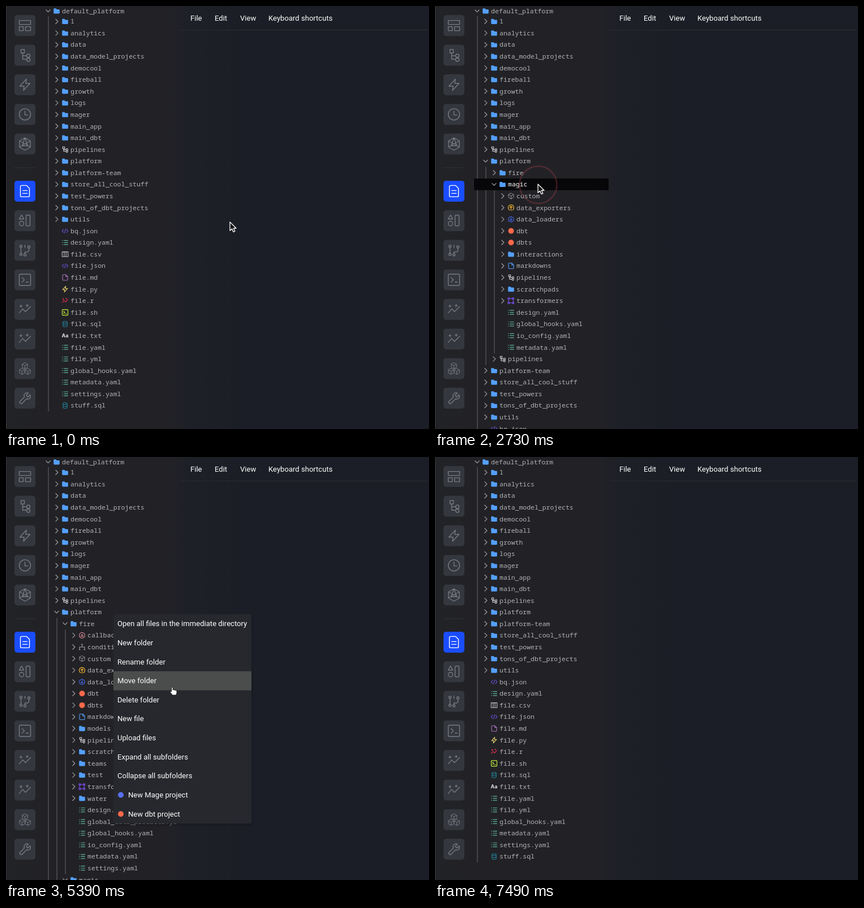
Animation, 748 px wide and 748 px high, one loop 7910 ms. Source, as an HTML page:

```html
<!DOCTYPE html>
<html lang="en">
<head>
<meta charset="utf-8">
<title>File browser</title>
<style>
  html, body { margin: 0; width: 100%; height: 100%; overflow: hidden; background: #1b1e26; }
  svg { display: block; width: 100vw; height: 100vh; }
  .mono { font: 11.47px "Noto Sans Mono", "DejaVu Sans Mono", monospace; fill: #b3b3b5; }
  .sans { font: 13.08px Roboto, Inter, sans-serif; fill: #fff; }
  .line { fill: none; stroke-linecap: round; stroke-linejoin: round; }
</style>
</head>
<body>
<svg viewBox="0 0 748 748" xmlns="http://www.w3.org/2000/svg">
  <defs>
    <linearGradient id="bg">
      <stop offset="0" stop-color="#222327"/>
      <stop offset=".1" stop-color="#222226"/>
      <stop offset=".38" stop-color="#222226"/>
      <stop offset=".43" stop-color="#1e2027"/>
      <stop offset=".56" stop-color="#1b1e26"/>
    </linearGradient>
    <clipPath id="panel"><rect width="301" height="748"/></clipPath>
  </defs>
  <rect width="748" height="748" fill="url(#bg)"/>
  <path d="M.5 0V748" stroke="#3a3b40"/>
  <path d="M310 42.5H746" stroke="#2b2d33"/>
  <g id="nav"></g>
  <g id="bar" class="sans"></g>
  <g id="tree"></g>
  <rect id="scroll" x="300" width="6.5" height="748" rx="2" fill="#48494d"/>
  <g id="menu"></g>
  <circle id="ring" fill="none" stroke="#a8424d" stroke-width="2.4"/>
  <g id="cursor" stroke-linejoin="round">
    <path id="arrow" d="M0 0V15.2L3.6 12L6.1 17.6L8.8 16.4L6.4 11H11Z" fill="#111" stroke="#fff" stroke-width="1.3"/>
    <path id="hand" d="M-1.3 1.2C-1.3-.4 1.2-.4 1.2 1.2V5C1.8 4.2 3.4 4.3 3.6 5.4C4.3 4.7 5.6 5 5.8 6.1C6.6 5.5 8 6 8 7.2V9.5C8 11.5 7 12 7 14H-.2C-.4 12-2.6 10.8-3.6 8.6C-4 7.4-2.6 6.6-1.3 8.2Z" fill="#fff" stroke="#111" stroke-width=".9"/>
  </g>
</svg>
<script>
const LOOP = 7910, STEP = 70, ROW = 20.58, TOP = 17;
const MENU = { x: 190, y: 278, w: 244, row: 33.64 };
const $ = id => document.getElementById(id);
const text = (x, y, s, extra = '') => `<text x="${x}" y="${y}" ${extra}>${s}</text>`;
const stroke = (d, color, width = 1.1) =>
  `<path class="line" d="${d}" stroke="${color}" stroke-width="${width}"/>`;
const dot = (r, color) => `<circle r="${r}" fill="${color}"/>`;

const BOLT = 'M1.2-5.2L-4.4 1H-.6L-1.4 5.2L4.4-1H.6Z';
const BRANCH = 'M-4.2-4.6H-.8V-1.4H-4.2ZM-2.5-1.4V3.4H1.4M-2.5.2H1.6M5 0A1.6 1.6 0 1 1 1.8 0A1.6 1.6 0 1 1 5 0M4.8 3.6A1.6 1.6 0 1 1 1.6 3.6A1.6 1.6 0 1 1 4.8 3.6';
const PAGE = 'M-4.4-3.8Q-4.4-5-3.2-5H1.2L4.6-1.6V3.8Q4.6 5 3.4 5H-3.2Q-4.4 5-4.4 3.8ZM1.2-5V-1.6H4.6';
const TREND = 'M-5 3L-1.8-.4L.8 2.2L5-2.4M-3.4-4V-2M-4.4-3H-2.4M2-4.6V-3M1.2-3.8H2.8';
const CUBE = 'M0-5L4.5-2.5V2.5L0 5L-4.5 2.5V-2.5Z';
const ROUND = 'M5 0A5 5 0 1 1-5 0A5 5 0 1 1 5 0';
const BOX = 'M-4-5H4Q5-5 5-4V4Q5 5 4 5H-4Q-5 5-5 4V-4Q-5-5-4-5Z';

const icons = {
  folder: '<path d="M-5.3-3.2Q-5.3-4.5-4-4.5H-1.2L.3-2.8H4Q5.3-2.8 5.3-1.5V3.3Q5.3 4.6 4 4.6H-4Q-5.3 4.6-5.3 3.3Z" fill="#54a0ff"/>',
  pipe: stroke(BRANCH, '#d6d6d8'),
  json: stroke('M-2.6-2.8L-5.2 0L-2.6 2.8M2.6-2.8L5.2 0L2.6 2.8M.9-3.6L-.9 3.6', '#6b50d7'),
  yaml: stroke('M-1.6-3.6H4.8M-1.6 0H4.8M-1.6 3.6H4.8M-4.6-3.6H-4.2M-4.6 0H-4.2M-4.6 3.6H-4.2', '#62b59f', 1.2),
  csv: stroke('M-5.2-4.3H5.2V4.3H-5.2ZM-1.7-4.3V4.3M1.7-4.3V4.3', '#c2c2c4'),
  md: stroke(PAGE, '#a871bd'),
  py: stroke(BOLT, '#e2cd6c'),
  r: stroke(TREND, '#e12d50', 1.2),
  sh: stroke(BOX + 'M-2.6-1.8L-.6 0L-2.6 1.8M.6 2.2H2.8', '#c3ee3e', 1.2),
  sql: stroke('M-3.8-3.4C-3.8-5.4 3.8-5.4 3.8-3.4V3.4C3.8 5.4-3.8 5.4-3.8 3.4ZM-3.8-3.4C-3.8-1.4 3.8-1.4 3.8-3.4M-3.8 0C-3.8 2 3.8 2 3.8 0', '#217c90'),
  txt: '<text text-anchor="middle" y="3.3" style="font:700 9px Inter,Roboto,sans-serif;fill:#e4e4e6">Aa</text>',
  callback: stroke(ROUND + 'M0-2.2L2.2 1.8H-2.2Z', '#cf8992'),
  cond: stroke('M-4.5 3.5V0H4.5V3.5M0 0V-3.5M-1.4-4.8H1.4M-5 4.6H-3.4M3.4 4.6H5', '#a5a6a9'),
  custom: stroke(CUBE + 'M-4.5-2.5L0 0L4.5-2.5M0 0V5', '#9c9da0', .9),
  out: stroke('M-2.4 4.4A5 5 0 1 1 2.4 4.4M0 5V-2.4M-2.2-.3L0-2.5L2.2-.3', '#eeb32f', 1.2),
  in: stroke(CUBE + 'M0-2.6V2.2M-2 .3L0 2.3L2 .3', '#4468e6'),
  dbt: dot(5, '#ff694a'),
  doc: stroke(PAGE, '#54a0ff'),
  trans: stroke('M-3.8-3.8H3.8V3.8H-3.8ZM-5.2-5.2H-2.6V-2.6H-5.2ZM2.6-5.2H5.2V-2.6H2.6ZM-5.2 2.6H-2.6V5.2H-5.2ZM2.6 2.6H5.2V5.2H2.6Z', '#7c50f0', 1)
};
const special = {
  pipelines: 'pipe', callbacks: 'callback', conditionals: 'cond', custom: 'custom',
  data_exporters: 'out', data_loaders: 'in', dbt: 'dbt', dbts: 'dbt',
  markdowns: 'doc', transformers: 'trans'
};
const iconOf = name => special[name] ||
  (name.includes('.') ? name.split('.').pop().replace('yml', 'yaml') : 'folder');

const list = s => s.split(' ');
const dirs = list('1 analytics data data_model_projects democool fireball growth logs mager main_app main_dbt pipelines platform');
const rest = list('platform-team store_all_cool_stuff test_powers tons_of_dbt_projects utils bq.json design.yaml file.csv file.json file.md file.py file.r file.sh file.sql file.txt file.yaml file.yml global_hooks.yaml metadata.yaml settings.yaml stuff.sql');
const fire = list('callbacks conditionals custom data_exporters data_loaders dbt dbts markdowns models pipelines scratchpads teams test transformers water design.yaml global_data_products.yaml global_hooks.yaml io_config.yaml metadata.yaml settings.yaml');
const magic = list('custom data_exporters data_loaders dbt dbts interactions markdowns pipelines scratchpads transformers design.yaml global_hooks.yaml io_config.yaml metadata.yaml');

// stage: 0 closed, 1 platform open, 2 magic open too, 3 fire open too
function rowsFor(stage) {
  const rows = [];
  const add = (names, depth) => names.forEach(name => rows.push({ name, depth }));
  const open = kids => {
    const row = rows[rows.length - 1];
    row.kids = kids.length;
    add(kids, row.depth + 1);
  };
  add(dirs, 1);
  if (stage) {
    const platform = rows[rows.length - 1];
    const before = rows.length;
    add(['fire'], 2);
    if (stage > 2) open(fire);
    add(['magic'], 2);
    if (stage > 1) open(magic);
    add(['pipelines'], 2);
    platform.kids = rows.length - before;
  }
  add(rest, 1);
  return rows;
}

function rowMarkup(name, depth, y, isOpen, hot) {
  const x = 74.5 + depth * 15;
  const chevron = name.includes('.') ? '' :
    stroke(isOpen ? `M${x - 3.6} ${y - 1.8}l3.6 3.6l3.6-3.6` : `M${x - 1.6} ${y - 4}l4 4l-4 4`, '#97989b', 1.3);
  return chevron + `<g transform="translate(${x + 15} ${y})">${icons[iconOf(name)]}</g>` +
    text(x + 24.5, y + 4, name, hot ? 'style="fill:#fff"' : '');
}

function treeMarkup(stage, hover, width) {
  const rows = rowsFor(stage);
  const end = TOP + rows.length * ROW;
  let guides = `M75 18V${end}`, body = '';
  rows.forEach((row, i) => {
    const y = TOP + (i + .5) * ROW;
    if (y > 765) return;
    if (row.kids) guides += `M${75 + row.depth * 15} ${y + 10.5}V${y + 10.5 + row.kids * ROW}`;
    body += rowMarkup(row.name, row.depth, y, row.kids, i === hover);
  });
  const bar = hover < 0 ? '' :
    `<rect x="69" y="${TOP + hover * ROW}" width="${width}" height="${ROW}" fill="#070709"/>`;
  return `<path d="${guides}" stroke="#66676b" fill="none"/>${bar}
    <g class="mono" clip-path="url(#panel)">${rowMarkup('default_platform', 0, 8.8, true)}${body}</g>`;
}

const commands = ['Open all files in the immediate directory', 'New folder', 'Rename folder',
  'Move folder', 'Delete folder', 'New file', 'Upload files', 'Expand all subfolders',
  'Collapse all subfolders', 'New Mage project', 'New dbt project'];

function menuMarkup(hover) {
  const { x, y, w, row } = MENU, h = row * commands.length;
  const marks = { 9: '#5a70f0', 10: '#ff694a' };
  let out = `<rect x="${x + 1}" y="${y + 2}" width="${w + 2}" height="${h + 2}" fill="#15171c" opacity=".4"/>
    <rect x="${x}" y="${y}" width="${w}" height="${h}" fill="#26282d"/>`;
  if (hover >= 0) out += `<rect x="${x}" y="${y + hover * row}" width="${w}" height="${row}" fill="#4b4d4c"/>`;
  commands.forEach((label, i) => {
    const cy = y + (i + .5) * row;
    if (marks[i]) out += `<g transform="translate(203 ${cy})">${dot(5, marks[i])}</g>`;
    out += text(marks[i] ? 216 : 197, cy + 4.4, label);
  });
  return `<g class="sans">${out}</g>`;
}

function drawNav() {
  const small = (x, y, s) => CUBE.replace(/-?\d*\.?\d+/g, n => n * s)
    .replace(/^M(\S+?)(-\S+?)L/, 'M$1$2L') && `M${x} ${y - 5 * s}l${4.5 * s} ${2.5 * s}v${5 * s}l${-4.5 * s} ${2.5 * s}l${-4.5 * s} ${-2.5 * s}v${-5 * s}zM${x - 4.5 * s} ${y - 2.5 * s}l${4.5 * s} ${2.5 * s}l${4.5 * s} ${-2.5 * s}M${x} ${y}v${5 * s}`;
  const circle = (x, y, r) => `M${x + r} ${y}a${r} ${r} 0 1 1 ${-2 * r} 0a${r} ${r} 0 1 1 ${2 * r} 0`;
  const trend = 'M-10 6L-4-1L1 4L10-5M-7-8V-4M-9-6H-5M4-9V-5M2-7H6';
  const shapes = [
    'M-10-9H10V-2H-10ZM-10 2H-3V9H-10ZM1 2H10V9H1Z',
    'M-7-10H-1V-4H-7ZM-4-4V7H3M-4 1H3' + circle(6, 1, 3) + circle(6, 8, 3),
    'M2.5-10L-9 2.5H-1.5L-2.5 10L9-2.5H1.5Z',
    circle(0, 0, 10) + 'M0-6V1H5',
    'M0-11L9.5-5.5V5.5L0 11L-9.5 5.5V-5.5ZM-9.5-5.5L9.5 5.5M9.5-5.5L-9.5 5.5M0-11L5 3H-5Z',
    'M-8-8Q-8-10-6-10H3L8-5V8Q8 10 6 10H-6Q-8 10-8 8ZM-4-1H4M-4 4H4',
    'M-6-10L-2-3H-10Z' + circle(-6, 5, 4) + 'M2-8Q2-10 4-10H7Q9-10 9-8V7Q9 9 7 9H4Q2 9 2 7Z',
    'M-7-5V5M7-4V0Q7 3 3 3H0V6M0-9V-5' + circle(-7, -7, 2) + circle(-7, 7, 2) + circle(7, -6, 2) + circle(0, 8, 2),
    'M-8-10H8Q10-10 10-8V8Q10 10 8 10H-8Q-10 10-10 8V-8Q-10-10-8-10ZM-5-4L-1 0L-5 4M2 4H6',
    trend, trend,
    small(0, -5, 1.05) + small(-5, 5, 1.05) + small(5, 5, 1.05),
    'M9-6L5-2L2-5L6-9C1-11-3-7-1-2L-9 6Q-10 8-8 9Q-6 11-4 8L3 1C8 3 11-1 9-6Z'
  ];
  $('nav').innerHTML = '<path d="M15 286H53" stroke="#303237"/>' + shapes.map((d, i) => {
    const y = i < 5 ? 34.6 + i * 52.35 : 327.4 + (i - 5) * 52.3;
    const on = i === 5;
    return `<g transform="translate(33.5 ${y})">
      <rect x="-18.5" y="-18.5" width="37" height="37" rx="5" fill="${on ? '#1a4dff' : '#34373d'}"/>
      ${stroke(d, on ? '#fff' : '#777a7f', i === 11 ? 1 : 1.4)}</g>`;
  }).join('');
}

// time, x, y, and 1 for steady speed on the way there
const path = [
  [0, 396, 382], [350, 396, 382], [1120, 179, 288], [1190, 180, 275], [1330, 180, 275],
  [1400, 182, 274], [1890, 182, 275], [1960, 182, 294], [2100, 182, 294], [2310, 182, 315],
  [2950, 182, 315], [3220, 182, 297], [3640, 182, 297], [3780, 182, 281], [3850, 182, 281],
  [3920, 182, 273], [4060, 182, 273], [4130, 190, 279], [4480, 190, 279], [4550, 192, 281],
  [4760, 192, 281], [5390, 294, 407, 1], [5600, 319, 500, 1], [5950, 333, 562], [LOOP, 333, 562]
];
const clicks = [1510, 2420, 3400, 4100, 6130];
const OPENED = clicks.map(s => s + 80);

function cursorAt(t) {
  const i = path.findIndex(p => p[0] > t);
  const [t0, x0, y0] = path[i - 1], [t1, x1, y1, steady] = path[i];
  const p = (t - t0) / (t1 - t0), k = steady ? p : p * p * (3 - 2 * p);
  return [x0 + (x1 - x0) * k, y0 + (y1 - y0) * k];
}

const drawn = {};
function put(id, key, make) {
  if (drawn[id] === key) return;
  drawn[id] = key;
  $(id).innerHTML = make();
}

function render(t) {
  const [x, y] = cursorAt(t);
  const stage = t >= OPENED[4] ? 0 : OPENED.slice(0, 3).filter(s => t >= s).length;
  const menuOpen = t >= OPENED[3] && t < OPENED[4];
  const onMenu = menuOpen && t > 4760;
  const scroll = t >= OPENED[2] && t <= 4760;
  const hover = !onMenu && x > 69 && x < 307 ? Math.floor((y - TOP) / ROW) : -1;
  const pick = onMenu ? Math.floor((y - MENU.y) / MENU.row) : -1;
  const width = scroll ? 231 : 238;

  put('tree', [stage, hover, width].join(), () => treeMarkup(stage, hover, width));
  put('menu', [menuOpen, pick].join(), () => menuOpen ? menuMarkup(pick) : '');
  $('scroll').setAttribute('visibility', scroll ? 'visible' : 'hidden');

  const age = t - (clicks.filter(s => s <= t).pop() ?? -LOOP);
  const glow = age > 400 ? 0 : Math.min(.8, .16 + age / 125) * Math.min(1, (400 - age) / 200);
  const ring = $('ring');
  ring.setAttribute('cx', x + .5);
  ring.setAttribute('cy', y + 1.2);
  ring.setAttribute('r', 15.3 + Math.min(age, 400) * .057);
  ring.setAttribute('opacity', glow);

  $('cursor').setAttribute('transform', `translate(${x} ${y})`);
  $('cursor').setAttribute('opacity', Math.max(0, Math.min(1, (7140 - t) / 210)));
  $('arrow').setAttribute('visibility', onMenu ? 'hidden' : 'visible');
  $('hand').setAttribute('visibility', onMenu ? 'visible' : 'hidden');
}

drawNav();
$('bar').innerHTML = text(326, 25.6, 'File') + text(369, 25.6, 'Edit') +
  text(414, 25.6, 'View') + text(464, 25.6, 'Keyboard shortcuts');

const start = performance.now();
function tick() {
  const t = (performance.now() - start) % LOOP;
  render(Math.floor(t / STEP) * STEP);
  requestAnimationFrame(tick);
}
tick();
</script>
</body>
</html>
```
